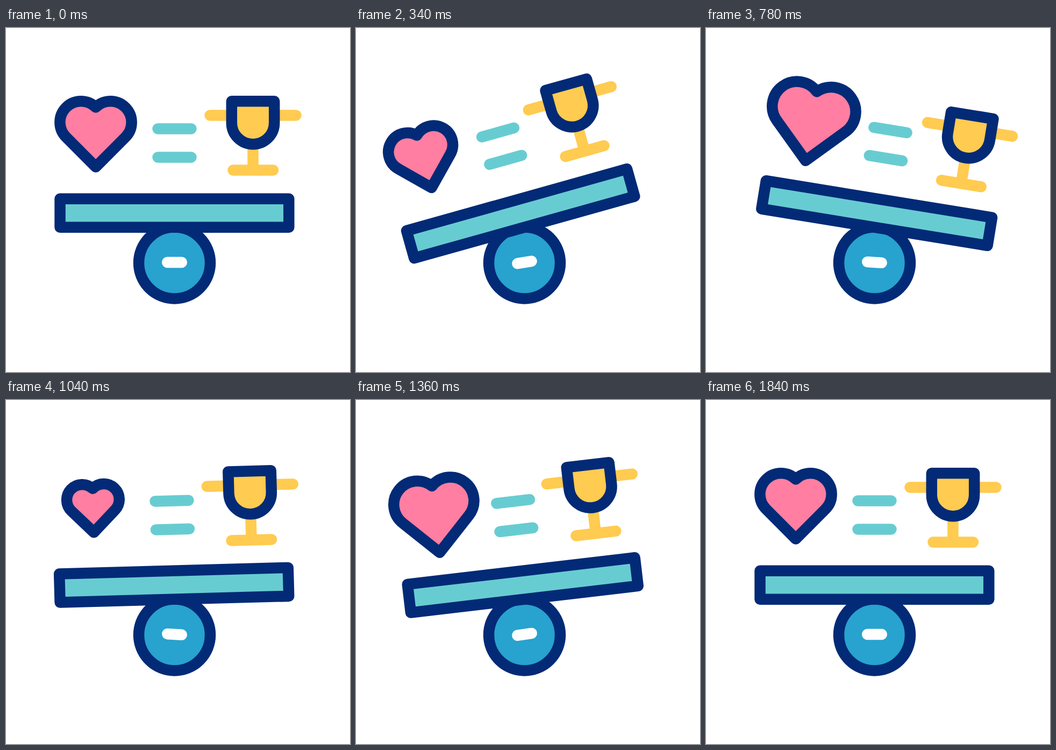
An HTML page for the animation above (2.4 s loop, 640x640 px).

```html
<!DOCTYPE html>
<html lang="en">
<head>
<meta charset="utf-8">
<title>Balance</title>
<style>
  html, body { margin: 0; width: 100%; height: 100%; overflow: hidden; background: #fff; }
  svg { display: block; width: 100%; height: 100%; }
  .line { fill: none; stroke-width: 20.5; stroke-linecap: round; stroke-linejoin: round; }
  .navy { stroke: #032a76; }
  .teal { stroke: #67ccd1; }
  .gold { stroke: #ffcb50; }
</style>
</head>
<body>
<svg viewBox="0 0 640 640">
  <circle class="line navy" cx="313.5" cy="437" r="66.5" style="fill:#28a2ce"/>
  <path id="dash" class="line" d="M300.2 436H326.8" stroke="#fff"/>
  <g id="board">
    <rect class="line navy" x="100.5" y="317.7" width="425.8" height="53" style="fill:#67ccd1"/>
    <path class="line teal" d="M282.5 187.5H344.5M282.5 240.5H344.5"/>
    <path class="line gold" d="M379.5 162.5H539.5M459.5 216V264.5M422.5 264.5H497"/>
    <path class="line navy" d="M419.8 136.2H499.2V176.5A39.7 39.7 0 0 1 419.8 176.5Z" style="fill:#ffcb50"/>
    <path id="heart" class="line navy" style="fill:#ff7ea1"
      d="M167 258.5L112 203.2A39 39 0 0 1 167 147.5A39 39 0 0 1 222 203.2Z"/>
  </g>
</svg>
<script>
  const LOOP = 2400, STEP = 20, STROKE = 20.5;

  // Each track is a list of [time in ms, value].
  const tilt = [[0, 0], [405, -16.7], [800, 9.4], [1225, -8.85], [1630, -0.2], [1740, 0.2], [1840, 0]];
  const lag = [[0, 0], [505, -12.5], [890, 7.5], [1335, -8.6], [1720, 0]];
  const pulse = [[0, 1], [265, 1], [460, 0.73], [800, 1.175], [1030, 0.732], [1290, 1.175], [1480, 1]];

  const [dash, board, heart] = ['dash', 'board', 'heart'].map(id => document.getElementById(id));

  function valueAt(track, t) {
    const i = track.findIndex(key => key[0] > t);
    if (i < 0) return track[track.length - 1][1];
    const [t0, a] = track[i - 1], [t1, b] = track[i];
    const eased = (1 - Math.cos(Math.PI * (t - t0) / (t1 - t0))) / 2;
    return a + (b - a) * eased;
  }

  function draw(t) {
    const s = valueAt(pulse, t);
    board.setAttribute('transform', `rotate(${valueAt(tilt, t)} 313.5 371)`);
    dash.setAttribute('transform', `rotate(${valueAt(lag, t)} 313.5 436)`);
    heart.setAttribute('transform', `translate(167 197.4) scale(${s}) translate(-167 -197.4)`);
    // Keep the outline weight constant while the heart scales.
    heart.style.strokeWidth = STROKE / s;
  }

  const start = performance.now();
  function tick() {
    const t = (performance.now() - start) % LOOP;
    draw(Math.floor(t / STEP) * STEP);
    requestAnimationFrame(tick);
  }
  tick();
</script>
</body>
</html>
```
